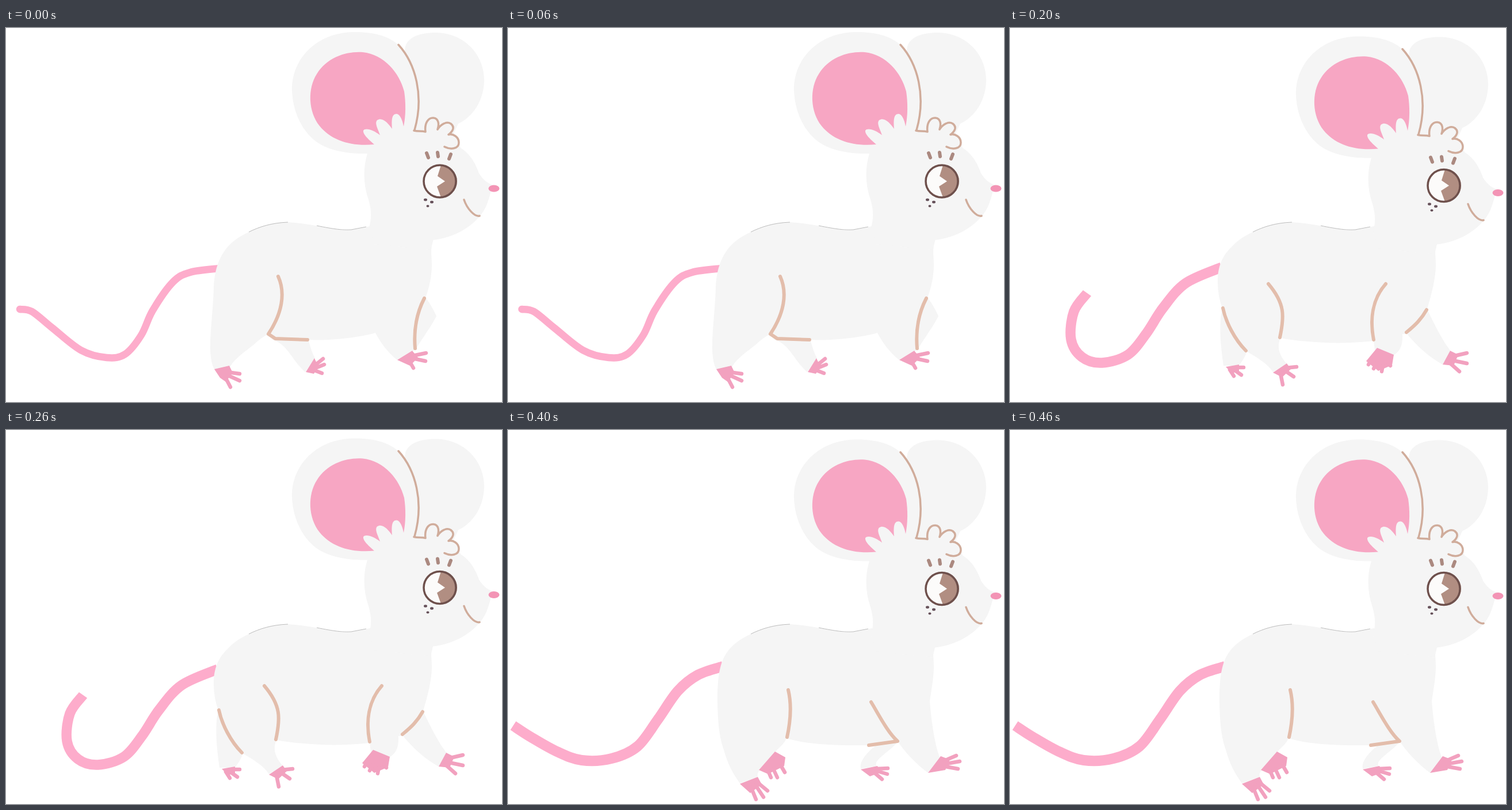
Recreate the animation shown at these times as an HTML page. Size 862 px wide and 649 px high, loop 0.5 s.

```html
<!DOCTYPE html>
<html lang="en">
<head>
<meta charset="utf-8">
<title>Walking mouse</title>
<style>
html, body { margin: 0; width: 100%; height: 100%; overflow: hidden; background: #fff; }
svg { display: block; width: 100%; height: 100%; }
path { stroke-linejoin: round; }
.fur { fill: #f5f5f5; }
.tail { fill: none; stroke: #fdaccb; }
.crease { fill: none; stroke: #e3bdab; stroke-width: 6; stroke-linecap: round; }
.palm { fill: #f2a1bf; }
.toes { fill: none; stroke: #f2a1bf; stroke-width: 6.5; stroke-linecap: round; }
.edge { fill: none; stroke: #bdbdbd; stroke-width: 1; }
.line { fill: none; stroke: #d0ac9b; stroke-width: 3.5; stroke-linecap: round; }
.lash { fill: none; stroke: #ab8980; stroke-width: 6; stroke-linecap: round; }
</style>
</head>
<body>
<svg viewBox="0 0 862 649">
  <path id="tail" class="tail"/>
  <path id="body" class="fur"/>
  <path class="edge" d="M422 354C440 345 462 338 490 337M540 343C570 349 585 351 600 350L626 345"/>
  <path id="creases" class="crease"/>
  <path id="palms" class="palm"/>
  <path id="toes" class="toes"/>
  <g id="head">
    <path class="fur" d="M690 60L694 32C700 14 722 8 748 8C798 9 832 48 831 92C830 128 810 155 786 166L770 200L700 185Z"/>
    <path class="fur" d="M628 218C600 219 558 214 535 194C509 172 497 136 497 105C497 55 538 9 602 7C640 6 668 15 684 31C712 62 722 115 709 178L729 179C727 165 734 155 743 156C752 157 753 167 750 176C755 168 765 161 773 166C781 172 777 180 770 185C780 184 787 190 787 201L790 208C809 220 817 238 822 252C830 265 838 270 848 273L842 286C838 302 833 316 823 327C806 347 778 364 742 368L738 385L640 375L631 346C635 332 636 318 630 298C621 272 620 244 628 218Z"/>
    <path fill="#f7a6c3" d="M640 202C600 206 565 195 545 170C525 145 524 105 540 80C558 50 593 40 620 42C657 46 684 78 692 110C695 130 695 152 691 171C689 160 685 150 679 149C670 149 670 160 671 175C664 165 654 154 645 160C640 165 647 176 650 186C640 178 625 172 621 178C620 185 632 195 640 202Z"/>
    <path class="line" d="M682 29C712 62 727 118 710 177M709 178C716 180 722 178 729 180C727 165 734 155 743 156C752 157 753 167 750 176C755 168 765 161 773 166C781 172 776 180 769 185C777 183 787 189 787 199C787 209 774 212 762 206M796 298C801 313 814 328 823 326"/>
    <path class="lash" d="M731 217L734 225M750 216L751 223M773 219L770 227"/>
    <circle cx="754" cy="266" r="28" fill="#fcfbfa"/>
    <path fill="#b18e82" d="M756 238A28 28 0 0 1 756 294L749 275 763 266 750 257Z"/>
    <circle cx="754" cy="266" r="28" fill="none" stroke="#6e504c" stroke-width="3.5"/>
    <g fill="#66515a">
      <ellipse cx="729" cy="298" rx="3" ry="2.3"/>
      <ellipse cx="740" cy="302" rx="3" ry="2.3"/>
      <ellipse cx="733" cy="309" rx="2.5" ry="2"/>
    </g>
    <ellipse cx="848" cy="278.5" rx="9.5" ry="6" fill="#f394b5"/>
  </g>
</svg>
<script>
const STEP = 100;
const BACK = 'M744 360L632 344C615 348 600 351 585 351C555 347 525 339 490 337C460 337 440 345 422 354C405 362 394 370 385 380';
const CHEST = 'C736 450 740 430 740 410C740 395 737 385 742 370Z';

// head: offset, tail: points from tip to rump, legs: underside from rump to chest
const poses = [
  {
    head: [0, 0], width: 12.5, cap: 'round',
    tail: [24, 488, 45, 492, 80, 520, 130, 559, 175, 572, 207, 566, 235, 533, 255, 490, 290, 441, 320, 424, 372, 417],
    legs: 'C368 400 362 425 361 450C360 490 354 530 355 560C356 575 358 585 362 592L388 591C395 575 415 562 430 550C440 540 450 534 456 531L463 541C478 545 487 556 497 570C505 582 512 590 520 597L537 573C530 560 528 548 525 541C560 543 610 538 642 529C650 545 665 565 680 576L712 558C722 540 738 520 748 500C743 488 735 475 729 468',
    creases: 'M473 431C486 460 480 495 456 531L468 539L524 541M727 469C716 490 708 520 711 556',
    palms: 'M362 592L388 586 394 598 382 614 372 607ZM680 576L706 560 716 572 702 586ZM521 597L536 573 543 588 535 600Z',
    toes: 'M384 597L406 600M384 602L406 612M380 604L390 623M706 569L730 564M706 573L729 578M700 576L708 590M536 586L551 574M538 590L553 584M536 594L549 599'
  },
  {
    head: [5, -3.5], width: 17, cap: 'butt',
    tail: [40, 478, 62, 484, 85, 508, 112, 560, 155, 578, 205, 568, 240, 538, 268, 478, 300, 440, 340, 414, 376, 409],
    legs: 'C372 395 366 415 366 440C366 470 373 495 387 517C382 530 383 540 395 552C405 562 418 568 428 573L452 577L461 602L492 597C497 575 500 560 501 543C540 547 590 543 621 540C624 555 625 570 621 586L659 583C660 560 686 545 699 523C715 533 745 543 757 548L780 530C763 520 745 505 731 470',
    creases: 'M498 439C497 470 487 497 440 532L500 544M440 532C450 555 455 575 458 592M729 471C722 490 710 510 700 522',
    palms: 'M426 574C440 571 450 573 456 579L450 598 428 596ZM461 601L490 595 493 608 478 615ZM622 587L645 581 655 589 644 598ZM755 549L779 529 789 545 764 562Z',
    toes: 'M434 590L427 603M440 592L436 610M448 592L449 607M484 603L504 606M482 606L497 614M474 607L485 625M645 585L665 589M645 589L662 601M640 591L645 604M782 542L799 557M776 547L787 565M762 552L765 568'
  },
  {
    head: [0, 7.5], width: 17.5, cap: 'butt',
    tail: [134, 460, 111, 492, 106, 540, 125, 571, 160, 581, 205, 567, 237, 530, 265, 487, 305, 443, 368, 415],
    legs: 'C368 396 361 415 361 440C361 460 365 475 369 486C363 510 365 545 371 586L398 586C403 578 410 570 411 561C430 572 448 583 457 597L481 583C468 567 463 555 470 538C520 547 580 549 632 543L634 558L666 568C678 562 683 550 682 531L690 531C710 555 730 572 752 584L766 561C750 540 738 515 725 488',
    creases: 'M449 444C478 478 477 500 469 537M370 486C375 510 390 540 410 560M653 444C630 470 625 505 632 541M724 489C715 505 705 515 689 528',
    palms: 'M375 588L398 584 398 595 386 599ZM457 598L481 582 488 592 473 606ZM619 578L638 555 667 567 664 585 640 595ZM752 584L765 560 779 567 771 586Z',
    toes: 'M392 589L406 589M388 592L402 602M382 593L389 604M478 590L498 588M477 594L493 605M470 599L474 619M628 575L623 584M638 580L632 591M648 585L646 596M656 580L661 586M768 570L794 564M770 577L794 582M764 581L781 596'
  },
  {
    head: [4.5, -3.5], width: 18, cap: 'butt',
    tail: [66, 472, 80, 520, 110, 555, 160, 576, 205, 562, 245, 514, 295, 455, 368, 418],
    legs: 'C370 395 361 415 357 446C342 470 339 500 342 530C337 555 338 570 343 583L386 582C397 577 408 572 413 563C430 590 455 612 480 618L495 590C485 570 490 555 496 541C540 547 590 545 620 543C632 550 645 575 656 590L677 573C680 565 682 558 684 551C704 545 720 556 740 563L776 545C770 525 745 508 718 495',
    creases: 'M355 453C372 490 395 520 410 560M464 451C495 470 497 505 495 538M641 462C640 500 640 520 650 535C660 543 670 548 682 551M606 544C622 545 640 543 655 539',
    palms: 'M343 583L384 583 378 597 362 603ZM478 618C485 608 488 598 496 589L514 595 507 614ZM655 592L677 572 690 584 673 601ZM739 564L776 545 780 566 755 573Z',
    toes: 'M374 589L394 598M370 593L386 609M362 594L368 613M502 592L517 580M505 600L526 590M503 607L526 608M680 582L703 587M680 588L698 602M668 593L673 607M745 566L742 590M758 567L758 584M768 564L766 590M774 561L776 586'
  },
  {
    head: [0, 9.5], width: 18, cap: 'butt',
    tail: [9, 513, 40, 533, 85, 558, 128, 573, 180, 570, 225, 549, 260, 503, 295, 453, 330, 425, 374, 410],
    legs: 'C368 400 365 425 364 460C364 500 366 530 375 555C382 580 390 595 403 613L434 602C431 590 450 577 464 559C470 552 480 545 484 535C520 546 570 548 640 547C625 558 610 575 613 588L640 583C636 572 658 562 678 541C690 560 710 580 730 595L751 569C742 550 735 500 733 470',
    creases: 'M487 451C494 480 490 510 485 533M631 472C645 495 660 525 677 540L627 547',
    palms: 'M403 614L434 602 441 615 421 630ZM436 590L464 558 482 568 480 583 452 597ZM613 589L642 583 648 594 629 601ZM730 595L752 566 768 572 760 590Z',
    toes: 'M434 612L451 626M430 616L444 637M422 619L431 641M451 589L457 603M461 588L468 603M474 582L481 594M640 588L660 587M642 592L659 597M636 594L650 606M758 574L779 565M762 579L785 575M760 584L782 588'
  }
];

const el = id => document.getElementById(id);
const set = (id, attrs) => {
  for (const key in attrs) el(id).setAttribute(key, attrs[key]);
};

// Smooth curve through a flat list of x, y pairs
function curve(list) {
  const n = list.length / 2;
  const at = (i, k) => list[2 * Math.max(0, Math.min(n - 1, i)) + k];
  const ctrl = (i, dir) => [0, 1].map(k => at(i, k) + dir * (at(i + 1, k) - at(i - 1, k)) / 6);
  let d = `M${at(0, 0)} ${at(0, 1)}`;
  for (let i = 0; i < n - 1; i++) {
    d += `C${[...ctrl(i, 1), ...ctrl(i + 1, -1), at(i + 1, 0), at(i + 1, 1)].join(' ')}`;
  }
  return d;
}

function draw(time) {
  const pose = poses[Math.floor(time / STEP) % poses.length];
  set('tail', { d: curve(pose.tail), 'stroke-width': pose.width, 'stroke-linecap': pose.cap });
  set('body', { d: BACK + pose.legs + CHEST });
  for (const part of ['creases', 'palms', 'toes']) set(part, { d: pose[part] });
  set('head', { transform: `translate(${pose.head})` });
}

const start = performance.now();
function tick() {
  draw(performance.now() - start);
  requestAnimationFrame(tick);
}
tick();
</script>
</body>
</html>
```
